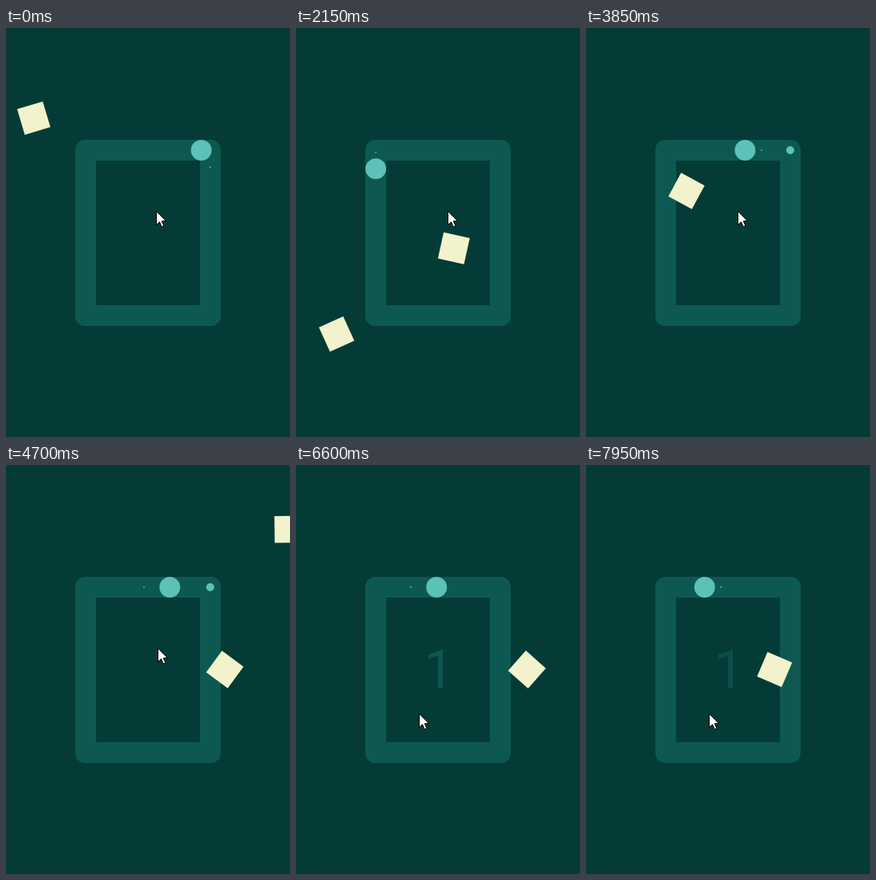
Write an HTML page with a canvas that moves like this. It is 356 px wide and 512 px high and loops after 8 s.

```html
<!DOCTYPE html>
<html lang="en">
<head>
<meta charset="utf-8">
<title>Track dodger</title>
<style>
  html, body { margin: 0; width: 100%; height: 100%; overflow: hidden; background: #043b36; }
  canvas { display: block; width: 100%; height: 100%; }
</style>
</head>
<body>
<canvas id="stage" width="356" height="512"></canvas>
<script>
const ctx = document.getElementById('stage').getContext('2d');
const LOOP = 8000;
const COLORS = { back: '#043b36', track: '#0d5952', ball: '#5cc1b6', square: '#f2f2cc' };
const CENTER = { x: 178, y: 256 };
const TRACK = { left: 100, right: 256, top: 153 };

// Ball turning points: [time, distance along the track from the top right corner].
const turns = [
  [-200, -37], [417, 111], [883, -1], [1429, 130], [1688, 68], [2510, 265.5],
  [3617, 0], [4262, 156], [4912, 0], [5358, 107], [5877, -17.5],
  [6442, 118], [6954, -5], [7542, 136], [7806, 72.5], [8000, 119]
];

// Squares appear once a second; each angle is the side they come from.
const FIRST_SPAWN = -312, SPAWN_GAP = 1000, SPAWN_RADIUS = 250;
const TRAVEL = 1648, SHRINK = 174, SPIN = -0.053;
const angles = [225, 45, 135, 225, 0, 315, 0, 0, 0];

const PICKUP = { born: 3700, taken: 4912 };

const clamp = v => Math.max(0, Math.min(1, v));
const mix = (a, b, u) => a + (b - a) * u;
const smooth = u => u * u * (3 - 2 * u);
const progress = (t, from, to) => clamp((t - from) / (to - from));

function disc(x, y, r, color) {
  ctx.fillStyle = color;
  ctx.beginPath();
  ctx.arc(x, y, r, 0, Math.PI * 2);
  ctx.fill();
}

function trackPoint(t) {
  const i = Math.max(1, turns.findIndex(([time]) => time >= t));
  const [t0, s0] = turns[i - 1], [t1, s1] = turns[i];
  const s = mix(s0, s1, (t - t0) / (t1 - t0));
  const width = TRACK.right - TRACK.left;
  if (s < 0) return [TRACK.right, TRACK.top - s];
  if (s > width) return [TRACK.left, TRACK.top + s - width];
  return [TRACK.right - s, TRACK.top];
}

function drawTrack() {
  ctx.fillStyle = COLORS.track;
  ctx.beginPath();
  ctx.roundRect(87, 140, 182, 233, 12);
  ctx.fill();
  ctx.fillStyle = COLORS.back;
  ctx.fillRect(113, 166, 130, 181);
}

function drawScore(t) {
  if (t < PICKUP.taken) return;
  const scale = mix(1.38, 1, smooth(progress(t, PICKUP.taken, 5200)));
  ctx.save();
  ctx.translate(CENTER.x, CENTER.y);
  ctx.scale(scale, scale);
  ctx.globalAlpha = mix(0.95, 0.7, progress(t, 6700, 7950));
  ctx.fillStyle = COLORS.track;
  ctx.font = '66px Roboto, sans-serif';
  ctx.textAlign = 'center';
  ctx.fillText('1', 1, 23);
  ctx.restore();
}

function drawBall(t) {
  if (t >= PICKUP.born && t < PICKUP.taken)
    disc(TRACK.right, TRACK.top, 5 * progress(t, PICKUP.born, 3840), COLORS.ball);
  const lastDrop = Math.floor((t - 66) / 100) * 100 + 66;
  for (let drop = lastDrop; t - drop < 140; drop -= 100)
    disc(...trackPoint(drop), 0.9, COLORS.ball);
  disc(...trackPoint(t), 13, COLORS.ball);
}

function drawSquares(t) {
  angles.forEach((degrees, i) => {
    const age = t - FIRST_SPAWN - i * SPAWN_GAP;
    if (age < 0 || age > TRAVEL + SHRINK) return;
    const angle = degrees * Math.PI / 180;
    const distance = SPAWN_RADIUS * (1 - progress(age, 0, TRAVEL));
    const size = 33.5 * (1 - progress(age, TRAVEL, TRAVEL + SHRINK));
    ctx.save();
    ctx.translate(CENTER.x + distance * Math.cos(angle), CENTER.y + distance * Math.sin(angle));
    ctx.rotate(SPIN * age * Math.PI / 180);
    ctx.fillStyle = COLORS.square;
    ctx.fillRect(-size / 2, -size / 2, size, size);
    ctx.restore();
  });
}

function drawCursor(t) {
  const slide = smooth(progress(t, 5700, 6100));
  const nudge = 2 * progress(t, 100, 300);
  ctx.save();
  ctx.translate(mix(188.5 + nudge, 154.5, slide), mix(229.5, 311.5, slide));
  ctx.beginPath();
  [[0, 0], [0, 17], [4, 13.3], [6.7, 19.3], [9.4, 18.1], [6.8, 12.3], [12, 12]]
    .forEach(([x, y]) => ctx.lineTo(x, y));
  ctx.closePath();
  ctx.fillStyle = '#fff';
  ctx.strokeStyle = '#000';
  ctx.lineWidth = 1;
  ctx.fill();
  ctx.stroke();
  ctx.restore();
}

function draw(now) {
  const t = now % LOOP;
  ctx.fillStyle = COLORS.back;
  ctx.fillRect(0, 0, 356, 512);
  drawTrack();
  drawScore(t);
  drawBall(t);
  drawSquares(t);
  drawCursor(t);
}

const start = performance.now();
function tick() {
  draw(performance.now() - start);
  requestAnimationFrame(tick);
}
tick();
</script>
</body>
</html>
```
